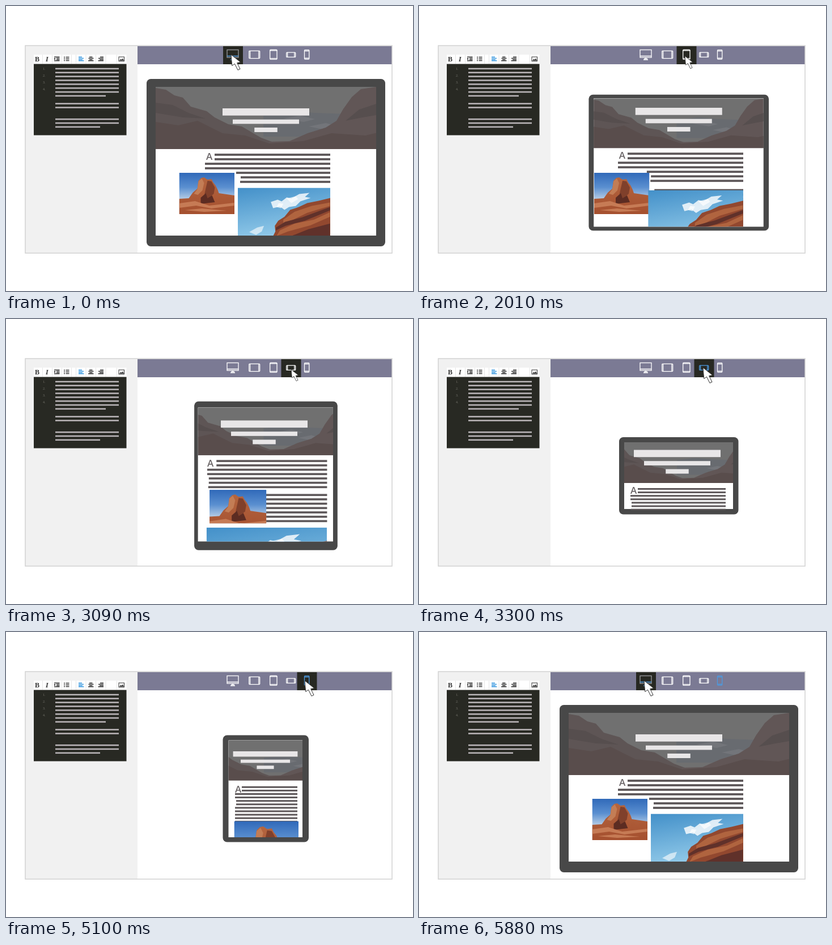
Animation, 718 px wide and 504 px high, one loop 6150 ms. Source, as an HTML page:

```html
<!DOCTYPE html>
<html lang="en">
<head>
<meta charset="utf-8">
<title>Responsive preview</title>
<style>
html, body { margin: 0; width: 100%; height: 100%; overflow: hidden; background: #fff; }
#stage { display: block; width: 718px; height: 504px; }
.icon { color: #fff; fill: none; stroke: currentColor; stroke-width: 1.3; }
.icon .solid { fill: currentColor; stroke: none; }
.icon.on { color: #4d9ae0; }
.icon.on .glass { stroke: #9b9ca0; }
.tool { fill: none; stroke: #333; stroke-width: 1.5; }
.serif { font: 12px "Liberation Serif", serif; fill: #333; }
.num { font: 6px "Liberation Serif", serif; fill: #77776f; }
#initial { font: 600 17px "Open Sans", sans-serif; fill: #6a6567; }
#lines rect { fill: #5d5759; }
#bars rect { fill: #e8e6e7; }
</style>
</head>
<body>
<svg id="stage" viewBox="0 0 718 504">
  <defs>
    <linearGradient id="skyA" x2="0" y2="1">
      <stop offset="0" stop-color="#3069b9"/><stop offset=".35" stop-color="#5a8fd0"/><stop offset=".65" stop-color="#b9cfe6"/>
    </linearGradient>
    <linearGradient id="skyB" x1="0" y1="0" x2=".3" y2="1">
      <stop offset="0" stop-color="#4390c9"/><stop offset="1" stop-color="#8fc8e8"/>
    </linearGradient>
    <linearGradient id="soil" x2="0" y2="1">
      <stop offset="0" stop-color="#b4653f"/><stop offset="1" stop-color="#a5502f"/>
    </linearGradient>
  </defs>

  <!-- window -->
  <rect x="34" y="70" width="647" height="367" fill="#fff"/>
  <rect x="34" y="70" width="198" height="367" fill="#f1f1f1"/>
  <rect x="232" y="71" width="449" height="32" fill="#7b7a94"/>
  <rect x="34" y="70" width="647" height="367" fill="none" stroke="#d2d2d2" stroke-width="1.5"/>

  <!-- editor -->
  <rect x="49" y="86" width="163.5" height="16.5" fill="#fff"/>
  <path d="M64.5 86v16M81.5 86v16M98.500 86v16M115.500 86v16M123.500 86v16M141 86v16M158.500 86v16M176 86v16M195.500 86v16" stroke="#e6e6e6"/>
  <text class="serif" x="51" y="97.500" font-weight="bold" style="font-weight:bold">B</text>
  <text class="serif" x="70" y="97.500" style="font-weight:bold;font-style:italic">I</text>
  <g class="tool">
    <path d="M85 90.300h9.500M89 92.500h5.500M89 94.700h5.500M85 96.800h9.500"/>
    <path d="M85 91.500l3 2-3 2z" fill="#333" stroke="none"/>
    <path d="M102 90.500h2M102 93.500h2M102 96.500h2M105.500 90.500h6M105.500 93.500h6M105.500 96.500h6"/>
    <path d="M128 90.300h6M128 92.500h9M128 94.700h7M128 96.800h9.500" stroke="#3f9be0"/>
    <path d="M147 90.300h5.500M145.500 92.500h9M147 94.700h5.500M145 96.800h9.500"/>
    <path d="M166 90.300h6M163 92.500h9M165 94.700h7M162.500 96.800h9.500"/>
    <rect x="199" y="90" width="9.500" height="7.500" stroke-width="1"/>
    <path d="M200 96.500l2.500-3 1.500 1.500 2-2.500 2 4z" fill="#333" stroke="none"/>
  </g>
  <rect x="49" y="102.500" width="163.500" height="126" fill="#282923"/>
  <g id="code" fill="#bcb7ba"></g>

  <!-- device bar -->
  <rect id="spot" y="71" width="35" height="32" fill="#272822"/>
  <g class="icon">
    <rect class="glass" x="390" y="77.500" width="20" height="13.500"/>
    <path d="M390 88.500h20M400 91v2.500M396 95h8"/><path class="solid" d="M397 92.500h6v1.500h-6z"/>
  </g>
  <g class="icon">
    <rect x="428.700" y="79.300" width="19" height="13.300" rx="1"/>
    <path d="M430.600 79v14M445.800 79v14"/>
  </g>
  <g class="icon">
    <rect x="465.700" y="77.300" width="12.300" height="17" rx="1"/>
    <path d="M465.500 78.800h13M465.500 92.700h13"/>
  </g>
  <g class="icon">
    <rect x="494.700" y="82.200" width="16" height="8.200" rx="1"/>
    <path d="M496.600 82v8.500M508.800 82v8.500"/>
  </g>
  <g class="icon">
    <rect x="526.500" y="77.700" width="8.300" height="16.300" rx="1"/>
    <path d="M526.500 79.500h8.300M526.500 92.200h8.300"/>
  </g>

  <!-- device -->
  <rect id="shell" rx="7.500" fill="#484848"/>
  <rect id="glass" fill="#fff"/>
  <svg id="copy">
    <text id="initial">A</text>
    <g id="lines"></g>
  </svg>
  <svg id="screen">
    <svg id="hero" viewBox="0 0 389 110" preserveAspectRatio="xMidYMid slice">
      <rect width="389" height="110" fill="#707070"/>
      <path d="M190 48l50-6 40 4 60 2v40H190z" fill="#686b70"/>
      <path d="M225 56l30-5 26 6-20 5zM270 70l30-6 20 5-25 6z" fill="#73757a"/>
      <path d="M0 2L18 5 33 15 48 19 62 35 90 43 104 54 128 66 152 70 186 90 205 97V110H0z" fill="#5e5555"/>
      <path d="M389 0L362 4 346 18 331 39 319 60 300 72 268 82 236 96 200 97V110H389z" fill="#615656"/>
      <path d="M0 62l40 6 34-8 44 22 40 4 42 14 60-4 50-14 60 4 59-14v42H0z" fill="#594d4c"/>
      <path d="M0 28l30 4 28 14 30 10-40-2-48-8zM389 30l-30 10-24 20 30-6 24-4z" fill="#564e4e"/>
    </svg>
    <g id="bars"></g>
    <svg id="butte" viewBox="0 0 97.500 73" preserveAspectRatio="xMidYMin slice">
      <rect width="97.500" height="73" fill="url(#skyA)"/>
      <path d="M0 46L17 45 24 35 32 28 34 14 39 9 44 8 50 12 57 11 60 17 64 22 68 30 70 36 97.500 40V73H0z" fill="url(#soil)"/>
      <path d="M34 15l6-5 4 8-3 13-8 8-7-2 6-8z" fill="#c37d55"/>
      <path d="M50 14l7 1 6 11-2 11-10 9-7 4 1-14z" fill="#80402b"/>
      <path d="M38 44l9-8 3 9 8-5 5 12-25 3z" fill="#5c2c22"/>
      <path d="M0 54l28-4 25 8 44-5v5l-40 5-27-5-30 4zM10 66l30-3 44 4-40 2z" fill="#c67b55"/>
    </svg>
    <svg id="cliff" viewBox="0 0 162.500 85" preserveAspectRatio="xMidYMin slice">
      <rect width="162.500" height="85" fill="url(#skyB)"/>
      <g fill="#fff">
        <path d="M58 25l12-4 7 3 9-7 8 2 14-8 18-2-8 7 10 2-18 6-8 8-12 2-8 5-8-6-12 3z" opacity=".8"/>
        <path d="M86 19l16-4 4 5-12 7zM72 27l8 1-4 8-8-2z" opacity=".7"/>
        <path d="M20 78l14-8 12-3-4 10-10 6z" opacity=".6"/>
      </g>
      <path d="M62 85L66 77 65 67 71 58 82 51 92 39 107 34 122 27 142 23 162.500 18V85z" fill="#92482f"/>
      <path d="M80 56l20-14 30-10 32-6v6l-40 12-26 13-16 6zM74 75l26-12 34-7 28-13v8l-34 15-40 11-20 8z" fill="#b0643f"/>
      <path d="M67 70l16-10 30-8 49-18v6l-44 18-34 9-17 8zM94 85l30-12 38-10v22z" fill="#60312a"/>
    </svg>
  </svg>

  <g id="cursor">
    <path d="M0 0L1.700 19.500 6.500 16.300 12 27.300 16 25.300 10.700 14.500 17 13.500z" fill="#fff" stroke="#333" stroke-width="1"/>
  </g>
</svg>

<script>
const LOOP = 6150, STEP = 30;
const $ = id => document.getElementById(id);
const clamp = v => Math.min(1, Math.max(0, v));
const ease = v => (v = clamp(v), v < .5 ? 2 * v * v : 1 - 2 * (1 - v) ** 2);

function add(parent, name, attrs = {}, text = '') {
  const el = document.createElementNS('http://www.w3.org/2000/svg', name);
  for (const k in attrs) el.setAttribute(k, attrs[k]);
  el.textContent = text;
  return parent.appendChild(el);
}
function place(el, x, y, width, height) {
  const box = { x, y, width: Math.max(0, width), height: Math.max(0, height) };
  for (const k in box) el.setAttribute(k, box[k]);
}
function view(el, x, y, w, h) {
  place(el, x, y, w, h);
  el.setAttribute('viewBox', [x, y, w, h].join(' '));
}

// shell, glass: left, top, right, bottom; bars: centre, top, scale;
// rows: right, first y, spacing, thickness; side: left, first y; pictures: x, y, w, h
const desktop = {
  shell: [248, 129, 669, 425], glass: [264, 143, 653, 406], fold: 253,
  bars: [458.5, 181, 1], initial: [353, 272], rows: [572, 263, 8, 3.8],
  left: [368, 368, 351, 351, 406, 414, 413], side: [412, 328],
  butte: [305.5, 295, 97.5, 73], cliff: [409, 321.5, 163, 85]
};
const devices = [
  desktop,
  { ...desktop, shell: [297, 159, 619.5, 395], glass: [306, 165, 610, 389] },
  {
    shell: [327.5, 132, 589.5, 422.5], glass: [333.5, 143, 582, 406], fold: 230,
    bars: [455.5, 168, 1], initial: [351, 250], rows: [572, 240.3, 8.05, 3.8],
    left: [368, 368, 351, 351, 354, 354, 353], side: [452.5, 298.3],
    butte: [349.5, 295, 97.5, 73], cliff: [349, 374, 222.5, 116]
  },
  {
    shell: [353, 209, 563.5, 345.5], glass: [362, 218, 554, 336], fold: 290,
    bars: [455.5, 231.5, 1], initial: [373, 309], rows: [541, 300.5, 6.1, 3],
    left: [386, 386, 373, 373, 375, 375, 374], side: [375, 370],
    butte: [402.5, 334.5, 113.5, -4], cliff: [375, 345, 166, 87]
  },
  {
    shell: [382.5, 182.5, 534, 371.5], glass: [392.5, 191.5, 523, 363], fold: 262.5,
    bars: [457.5, 211, .744], initial: [404, 284], rows: [514, 274.3, 6.1, 3],
    left: [416, 416, 404, 404, 406, 406, 404], side: [404, 317],
    butte: [402.5, 334.5, 113.5, 29], cliff: [402.5, 425, 113.5, 60]
  },
  desktop
];
const spots = [383, 420.5, 454.5, 485.5, 513.5, 383];
const tips = [397, 433, 467.5, 501, 530, 397];
const moves = [330, 1440, 2520, 3600, 5310];
const clicks = [780, 1920, 2970, 4050, 5550];

function lerp(a, b, k) {
  if (typeof a === 'number') return a + (b - a) * k;
  if (Array.isArray(a)) return a.map((v, i) => lerp(v, b[i], k));
  return Object.fromEntries(Object.keys(a).map(key => [key, lerp(a[key], b[key], k)]));
}
function pick(list, pos) {
  const i = Math.min(Math.floor(pos), list.length - 2);
  return lerp(list[i], list[i + 1], pos - i);
}
const progress = (starts, t) => starts.reduce((sum, s) => sum + ease((t - s) / 300), 0);

// editor contents
for (let i = 0; i < 16; i++) {
  if ([8, 11, 12].includes(i)) continue;
  const width = i === 7 ? 89 : i === 15 ? 79 : 112;
  add($('code'), 'rect', { x: 87, y: 109.6 + i * 6.87, width, height: 2.5 });
}
for (let i = 0; i < 4; i++) add($('code'), 'text', { class: 'num', x: 65, y: 113 + i * 12 }, `${i + 1}.`);

const lines = Array.from({ length: 14 }, () => add($('lines'), 'rect'));
const bars = [[153, 0, 12.7], [117, 19.7, 7.7], [40.5, 34, 8]].map(size => ({ size, el: add($('bars'), 'rect') }));
const icons = document.querySelectorAll('.icon');

function drawDevice(d) {
  const [sl, st, sr, sb] = d.shell, [l, t, r, b] = d.glass;
  place($('shell'), sl, st, sr - sl, sb - st);
  place($('glass'), l, t, r - l, b - t);
  view($('copy'), l, t, r - l, b - t + 2);
  view($('screen'), l, t, r - l, b - t);
  place($('hero'), l, t, r - l, d.fold - t);
  place($('butte'), ...d.butte);
  place($('cliff'), ...d.cliff);

  const [cx, top, s] = d.bars;
  for (const { size: [w, dy, h], el } of bars) place(el, cx - w * s / 2, top + dy * s, w * s, h * s);

  $('initial').setAttribute('x', d.initial[0]);
  $('initial').setAttribute('y', d.initial[1]);
  const [right, first, gap, thick] = d.rows;
  lines.forEach((el, i) => {
    const x = i < 7 ? d.left[i] : d.side[0];
    const y = i < 7 ? first + i * gap : d.side[1] + (i - 7) * gap;
    place(el, x, y - thick / 2, right - x, thick);
  });
}

function drawCursor(t) {
  const pos = progress(moves, t);
  $('spot').setAttribute('x', pick(spots, pos));
  const drift = 3 * Math.min(1.3, Math.max(0, (t - 4380) / 720)) * (5 - pos);
  const x = pick(tips, pos) - drift;
  // a click shrinks the pointer about its middle
  const press = clicks.reduce((m, c) => Math.max(m, 1 - Math.abs(t - c - 150) / 150), 0);
  const s = 1 - .28 * ease(press);
  $('cursor').setAttribute('transform', `translate(${x + 8.5} 99.5) scale(${s}) translate(-8.5 -13.5)`);
}

function isOn(i, t) {
  if (i === 0) return t <= moves[0] + STEP || t >= clicks[4] + 150;
  return t >= clicks[i - 1] + 150 && (i === 4 || t <= moves[i] + STEP);
}

function frame(now) {
  const t = Math.floor(now % LOOP / STEP) * STEP;
  drawDevice(pick(devices, progress(clicks.map(c => c + STEP), t)));
  drawCursor(t);
  icons.forEach((el, i) => el.classList.toggle('on', isOn(i, t)));
}

let start;
function tick(now) {
  start ??= now;
  frame(now - start);
  requestAnimationFrame(tick);
}
frame(0);
requestAnimationFrame(tick);
</script>
</body>
</html>
```
